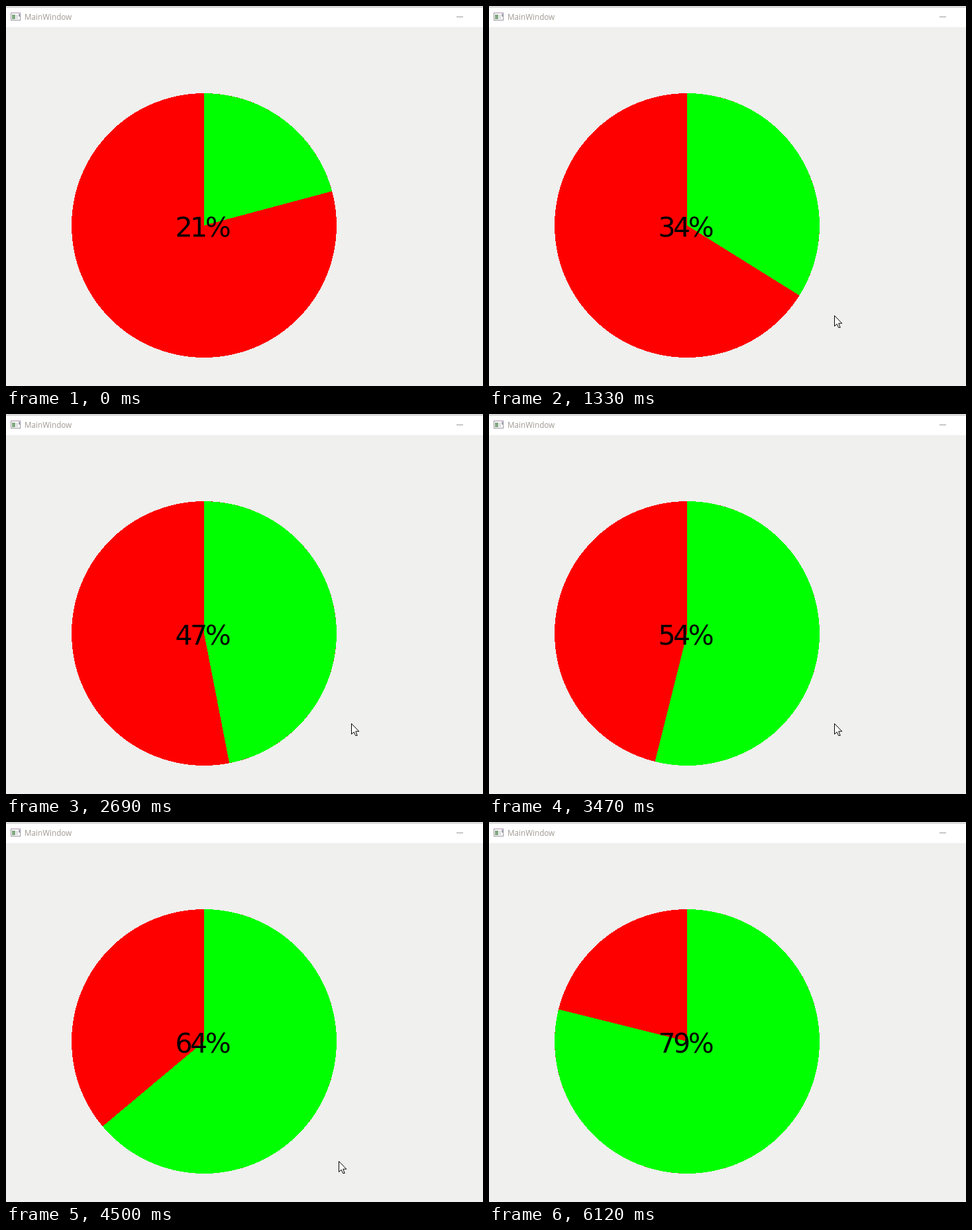
Animation of 720x575 px, one loop 6.24 s. Source, as an HTML page:

```html
<!DOCTYPE html>
<html lang="en">
<head>
<meta charset="utf-8">
<title>MainWindow</title>
<style>
  html, body { margin: 0; width: 100%; height: 100%; overflow: hidden; background: #f0f0ee; }
  svg { display: block; width: 720px; height: 575px; }
  .title { font: 11.7px "Open Sans", "Noto Sans", sans-serif; fill: #a09a92; }
  .label { font: 41px "DejaVu Sans", sans-serif; letter-spacing: -3.5px; fill: #000; }
</style>
</head>
<body>
<svg viewBox="0 0 720 575">
  <rect width="720" height="575" fill="#f0f0ee"/>
  <rect width="720" height="32" fill="#fff"/>
  <rect y="1" width="720" height="1" fill="#a8a4a4"/>
  <g shape-rendering="crispEdges">
    <rect x="7.5" y="10.5" width="14" height="11" fill="#fff" stroke="#9c98a0"/>
    <rect x="8" y="10" width="13" height="1" fill="#a88fa8"/>
    <rect x="9" y="13" width="5" height="7" fill="#82a882"/>
    <rect x="15" y="13" width="3" height="7" fill="#dedede"/>
    <rect x="19" y="12" width="2" height="4" fill="#9da3b5"/>
    <rect x="680" y="16" width="10" height="1" fill="#999"/>
    <circle cx="299" cy="332" r="200" fill="#f00"/>
    <path id="slice" fill="#0f0"/>
  </g>
  <text class="title" x="28" y="21">MainWindow</text>
  <text id="label" class="label" x="255.5" y="349"></text>
  <path id="cursor" d="M.5 .5V16.5L4.2 13.2L6.6 18.5H9.2L6.8 12.2H11.8Z" fill="#fff" stroke="#000"/>
</svg>
<script>
const LOOP = 6240;
const CX = 299, CY = 332, R = 200;
const FIRST = 21, TICK = 105.4, PHASE = 55;

// Pointer path: it comes in, rests, swings right and leaves.
const path = [
  { t: 480, x: 650, y: 575 },
  { t: 690, x: 527, y: 480 },
  { t: 780, x: 521, y: 468 },
  { t: 4440, x: 521, y: 468 },
  { t: 4500, x: 501, y: 513 },
  { t: 4620, x: 618, y: 535 },
  { t: 5280, x: 620, y: 530 },
  { t: 5550, x: 660, y: 575 }
];

const [slice, label, cursor] = ["slice", "label", "cursor"].map(id => document.getElementById(id));

function drawPie(value) {
  // The slice grows in whole degrees.
  const angle = Math.floor(value * 3.6) * Math.PI / 180;
  const x = CX + R * Math.sin(angle), y = CY - R * Math.cos(angle);
  slice.setAttribute("d", `M${CX} ${CY}V${CY - R}A${R} ${R} 0 ${+(angle > Math.PI)} 1 ${x} ${y}Z`);
  label.textContent = value + "%";
}

function drawCursor(t) {
  const i = path.findLastIndex(p => p.t <= t);
  const a = path[i], b = path[i + 1];
  cursor.style.display = a && b ? "" : "none";
  if (!a || !b) return;
  const k = (t - a.t) / (b.t - a.t);
  const mix = (u, v) => Math.round(u + (v - u) * k);
  cursor.setAttribute("transform", `translate(${mix(a.x, b.x)} ${mix(a.y, b.y)})`);
}

const start = performance.now();
function frame() {
  const t = (performance.now() - start) % LOOP;
  drawPie(FIRST + Math.floor((t + PHASE) / TICK));
  drawCursor(t);
  requestAnimationFrame(frame);
}
frame();
</script>
</body>
</html>
```
